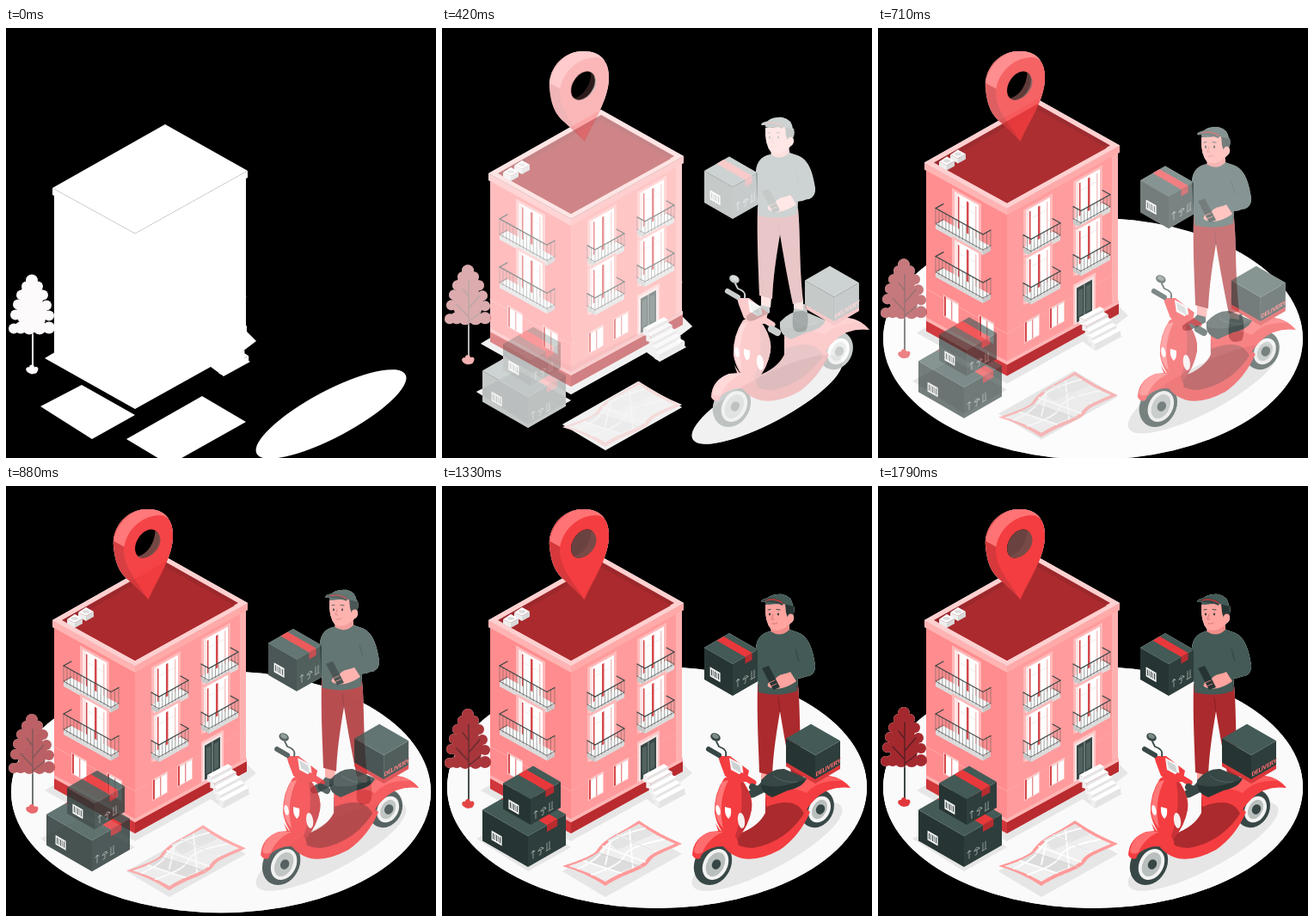
Animation, 500 px wide and 500 px high, one loop 1.83 s. Source, as an HTML page:

```html
<!DOCTYPE html>
<html lang="en">
<head>
<meta charset="utf-8">
<title>Delivery</title>
<style>
html, body { margin: 0; width: 100%; height: 100%; overflow: hidden; background: #000; }
svg { display: block; width: 100vw; height: 100vh; }
text { font: 600 7px Roboto, "Liberation Sans", sans-serif; letter-spacing: -.3px; }
</style>
</head>
<body>
<script>
const LOOP = 1830, FRAME = 41.6;
const DARK = '#374745', DEEP = '#263533', MID = '#2e3e3c', KNIT = '#435a56';
const RED = '#f43d40', WINE = '#ab2a2d', PALE = '#ffc6c6', SKIN = '#ffa49f';

const poly = (pts, fill) => `<polygon points="${pts}" fill="${fill}"/>`;
const path = (d, fill, extra = '') => `<path d="${d}" fill="${fill}" ${extra}/>`;
const line = (d, color, w = 1) =>
  `<path d="${d}" fill="none" stroke="${color}" stroke-width="${w}" stroke-linecap="round"/>`;
const rect = (x, y, w, h, fill) => `<rect x="${x}" y="${y}" width="${w}" height="${h}" fill="${fill}"/>`;
const oval = (x, y, rx, ry, fill, turn = 0) =>
  `<ellipse cx="${x}" cy="${y}" rx="${rx}" ry="${ry}" fill="${fill}" transform="rotate(${turn} ${x} ${y})"/>`;
const skew = (x, y, slope, body) => `<g transform="matrix(1 ${slope} 0 1 ${x} ${y})">${body}</g>`;
const LEFT = .553, RIGHT = -.557;

// x, y is the front corner of the lid; a and b are the widths of the left and right faces
function carton(x, y, a, b, h, marked = true) {
  const s = .575;
  const at = (u, v, d = 0) => `${x - a * u + b * v},${y - s * (a * u + b * v) + d} `;
  let out = poly(at(0, 0) + at(1, 0) + at(1, 0, h) + at(0, 0, h), DEEP)
    + poly(at(0, 0) + at(0, 1) + at(0, 1, h) + at(0, 0, h), MID)
    + poly(at(0, 0) + at(1, 0) + at(1, 1) + at(0, 1), KNIT);
  if (!marked) return out;
  out += poly(at(0, .5) + at(1, .5) + at(1, .78) + at(0, .78), '#e9383b')
    + poly(at(0, .5) + at(0, .78) + at(0, .78, 8) + at(0, .5, 8), '#b82c30');
  let bars = rect(0, 0, 12, 11, '#f5f5f5');
  for (let i = 0; i < 5; i++) bars += rect(1.5 + i * 2, 2, i % 2 ? .6 : 1, 7, DEEP);
  out += skew(x - a * .8, y - s * a * .8 + h * .5, s, bars);
  const icons = 'M3 1V10M1 3L3 1L5 3M9 5Q12 0 15 5ZM12 5V9Q12 11 10 10M19 1V10M22 1V10M18 10H23';
  return out + skew(x + 3, y + h * .55 - 2, -s, line(icons, '#a9b1af', .8));
}

function frenchWindow(x, y, slope) {
  const b = rect(-3, -3, 34, 55, '#ffb9b9') + rect(0, 0, 28, 52, '#fff') + rect(0, 0, 4, 52, '#fbe6e6')
    + rect(4, 3, 1.5, 49, '#d5484b') + rect(14, 3, 2.5, 49, '#d5484b') + rect(24, 3, 1.5, 49, '#f3c6c6')
    + rect(6, 12, 7, .8, '#e4e4e4') + rect(17, 12, 7, .8, '#e4e4e4');
  return skew(x, y, slope, b);
}
function smallWindow(x, y, slope) {
  return skew(x, y, slope, rect(-1, -1, 18, 25, PALE) + rect(0, 0, 16, 23, '#fff')
    + rect(0, 0, 2, 23, '#d5484b') + rect(8, 0, 1.4, 23, '#e58c8d') + rect(2, 0, 14, 1.5, '#f3c6c6'));
}

// front rail starts at x, y on slab level; dx is its run and side is the end joined to the wall
function balcony(x, y, dx, slope, side, h) {
  const dy = dx * slope, s = side * 9;
  const x2 = x + dx, y2 = y + dy;
  let out = poly(`${x},${y - 4} ${x + s},${y - 9} ${x2 + s},${y2 - 9} ${x2},${y2 - 4}`, '#fafafa')
    + poly(`${x},${y - 4} ${x2},${y2 - 4} ${x2},${y2 + 1} ${x},${y + 1}`, '#dcdcdc');
  const ex = side > 0 ? x2 : x, ey = side > 0 ? y2 : y;
  out += poly(`${ex},${ey - 4} ${ex + s},${ey - 9} ${ex + s},${ey - 4} ${ex},${ey + 1}`, '#c9c9c9');
  const n = Math.round(dx / 4);
  let thin = '';
  for (let i = 0; i <= n; i++) thin += `M${x + dx * i / n} ${y + dy * i / n - 4}v${4 - h}`;
  for (let i = 1; i < 3; i++) thin += `M${ex + s * i / 2} ${ey - 4 - 2.5 * i}v${4 - h}`;
  const rail = k => `M${x + s} ${y - k - 5}L${x} ${y - k}L${x2} ${y2 - k}L${x2 + s} ${y2 - k - 5}`;
  return out + line(thin, '#4a5553', .5) + line(rail(h), '#3a4644', 1.2) + line(rail(5), '#4a5553', .8);
}

function building() {
  let o = poly('56,160 150,212 150,404 56,351', '#ff8c8e')
    + poly('150,212 279,140 279,332 150,404', '#ff9b9c')
    + poly('56,340 150,391 150,404 56,352', '#d0363a') + poly('150,391 280,320 280,332 150,404', '#b92b2f')
    + poly('56,336 150,387 150,391 56,340', '#ffb0b0') + poly('150,387 280,316 280,320 150,391', '#ffb5b5')
    + line('M56 303L150 355L279 283', '#ffa6a6', 1)
    + poly('272,147 279,143 279,316 272,320', '#ffb0b0');
  o += poly('54,156 150,209 150,217 54,164', '#ffb3b3') + poly('150,209 281,136 281,144 150,217', '#ffa9a9')
    + poly('54,156 185,82 281,136 150,209', '#ffd0d0')
    + poly('65,156 185,88 270,136 150,203', '#9c282c') + poly('70,159 185,94 266,139 150,203', WINE);
  for (const [x, y] of [[84, 147], [71, 155]])
    o += poly(`${x},${y} ${x + 9},${y - 6} ${x + 18},${y - 1} ${x + 9},${y + 4}`, '#fff')
      + poly(`${x},${y} ${x + 9},${y + 4} ${x + 9},${y + 10} ${x},${y + 5}`, '#eee')
      + poly(`${x + 9},${y + 4} ${x + 18},${y - 1} ${x + 18},${y + 5} ${x + 9},${y + 10}`, '#d9d9d9')
      + oval(x + 9, y - 1, 4, 2, '#ddd');
  for (const dy of [0, 56]) {
    o += frenchWindow(89, 190 + dy, LEFT) + balcony(67, 232 + dy, 55, LEFT, 1, 23);
    for (const [dx, up] of [[58, 33], [0, 0]])
      o += frenchWindow(172 + dx, 212 + dy - up, RIGHT) + balcony(178 + dx, 264 + dy - up, 34, RIGHT, -1, 19);
  }
  o += smallWindow(77, 311, LEFT) + smallWindow(118, 334, LEFT)
    + smallWindow(171, 342, RIGHT) + smallWindow(200, 326, RIGHT);
  o += skew(229, 300, RIGHT, rect(-2, -3, 26, 47, PALE) + rect(0, 0, 22, 44, '#f6e3e3') + rect(2, 3, 18, 40, DARK)
    + rect(10.5, 3, 1, 40, '#8fa09d') + rect(4, 7, 5, 30, '#52625f') + rect(13, 7, 5, 30, '#52625f'));
  for (let i = 0; i < 5; i++) {
    const x = 234 + i * 3.4, y = 336 + i * 7, w = 24 + i * 1.4, r = w * .53;
    o += poly(`${x},${y} ${x + w},${y - r} ${x + w + 5},${y - r + 3} ${x + 5},${y + 3}`, '#fff')
      + poly(`${x + 5},${y + 3} ${x + w + 5},${y - r + 3} ${x + w + 5},${y - r + 9} ${x + 5},${y + 9}`, '#e4e4e4')
      + poly(`${x},${y} ${x + 5},${y + 3} ${x + 5},${y + 9} ${x},${y + 8}`, '#f0f0f0');
  }
  return o;
}

const shadows = () =>
  poly('45,354 150,413 238,364 253,375 284,358 270,350 291,334 275,318 150,380 60,345', '#e6e6e6')
  + poly('40,410 88,385 150,420 100,448', '#e6e6e6')
  + poly('140,448 228,398 279,428 190,478', '#e6e6e6')
  + oval(378, 419, 98, 27, '#e6e6e6', -28);

const pin = () =>
  path('M164 27C140 27 123 48 125 70C127 92 133 102 143 110L166 132C174 112 194 84 194 58C194 38 184 27 164 27Z', '#d6383b')
  + path('M164 27C143 27 128 45 125 64L138 71C142 53 158 37 178 35L189 38C184 30 175 27 164 27Z', '#ff7375')
  + path('M179 34C157 34 137 54 137 76C138 98 154 112 165 132C173 112 194 84 194 58C194 43 189 34 179 34Z', RED)
  + oval(164, 67, 12, 18, '#000', 32) + `<g id="inner">${oval(164, 67, 12, 18, '#6a4240', 32)}</g>`
  + path('M173.5 51.7C181 56 182 67 174 76C167 84 158 85 153 82C165 79 173 66 173.5 51.7Z', '#784a47');

function tree() {
  const leaves = [[30, 264, 7], [24, 271, 6], [37, 271, 6], [18, 281, 6], [43, 281, 6], [30, 282, 14], [14, 292, 6],
    [47, 293, 6], [30, 302, 18], [11, 304, 6], [50, 305, 6], [9, 320, 6], [17, 319, 7], [27, 319, 8], [39, 319, 8], [50, 319, 7]];
  return leaves.map(([x, y, r]) => oval(x, y, r, r, '#a4292e')).join('')
    + line('M31 368V275M31 318L17 303M31 308L44 293M31 323L45 312M31 294L24 285', '#571f23', 1.4)
    + line('M31 368V328', '#3e4543', 2)
    + path('M30 373C21 371 22 364 27 365C27 361 33 361 33 365C38 363 39 368 35 372Z', '#e2383b');
}

const map = () =>
  path('M140 442C158 436 172 431 179 425C190 408 204 406 229 389Q252 405 279 416C260 425 246 429 241 437C235 447 212 450 190 465Q166 449 140 442Z', '#ff9a9a')
  + path('M147 442C164 437 176 431 182 426C194 411 206 407 229 393Q249 407 271 416C255 423 243 427 238 434C231 444 210 447 190 460Q169 448 147 442Z', '#efefef')
  + poly('166,435 183,426 228,441 207,449', '#dcdcdc') + poly('192,412 229,393 246,405 204,423', '#e4e4e4')
  + line('M158 445Q182 434 189 421T236 398M174 452Q208 441 212 430T258 411M165 436L208 450M187 419L236 437M204 406L248 425M218 400L222 444M196 413L190 440', '#fff', 1.8)
  + line('M183 427L233 443M203 406L246 424', '#d2d2d2', .8);

function man() {
  return path('M372 342c-3 8 -12 9 -18 15c-1 5 3 7 9 5l18 -9v-11Z', DARK)
    + path('M410 344c-2 10 -3 18 -2 26q3 9 15 4q5 -10 0 -31Z', DARK)
    + poly('371,330 383,334 382,347 371,344', SKIN) + poly('409,336 420,338 420,350 409,348', SKIN)
    + path('M367 230L414 232C417 262 415 296 420 340L408 343C402 314 398 292 393 262C388 292 385 312 384 337L369 333C368 300 366 270 367 230Z', WINE)
    + line('M393 262L391 246', '#842025', 1)
    + poly('384,158 403,158 405,174 394,180 382,172', '#f08d8a')
    + path('M382 169C370 171 364 180 365 194L368 240Q394 246 413 238L414 222L427 221Q435 217 434 208C431 190 427 175 413 170L404 167Q394 177 382 169Z', KNIT)
    + line('M411 190L415 204L410 220M413 233L412 216', DARK, 1.2)
    + path('M411 202L432 212Q428 223 412 224L398 230L393 218L411 211Z', KNIT)
    + path('M405 216L412 227C400 236 386 238 379 233C377 229 384 226 388 224C392 218 400 219 405 216Z', SKIN)
    + path('M372 212L380 209L393 234L385 237Z', DEEP)
    + line('M387 226L380 229M389 230L382 233', '#e0827f', .9)
    + path('M376 138L403 136Q410 148 405 160Q394 171 383 167Q375 158 376 138Z', SKIN)
    + path('M399 137L409 139Q411 147 407 151L402 154L400 147Z', DEEP)
    + oval(405, 154, 4, 5.5, SKIN, 15)
    + oval(381, 149, 1, 1.6, '#2a3130') + oval(391, 149, 1, 1.6, '#2a3130')
    + line('M379 144L382 143.5M389 143.5L393 144', DARK, 1)
    + line('M385 149L383 155L386 155M384 160Q388 161 390 159', '#d97676', 1)
    + path('M376 137C376 128 386 125 396 126Q407 128 408 140Q397 135 380 138Z', KNIT)
    + path('M373 132Q383 127 397 135L396 139Q384 134 372 135Q370 134 373 132Z', DARK)
    + line('M377 133Q387 130 396 136', '#c4383b', 1.3);
}

function scooter() {
  const wheel = (x, y, rx, ry) => oval(x, y, rx, ry, DARK, 28) + oval(x + 3, y + 1, rx - 7, ry - 7, '#f3f3f3', 28)
    + oval(x + 3, y + 1, rx - 11, ry - 11, '#b9bfbd', 28) + oval(x + 4, y + 1, 5, 6, DARK, 28);
  return wheel(436, 375, 19, 23) + wheel(315, 439, 21, 26)
    // floor board and rear body
    + path('M376 362L405 352L430 362Q420 400 372 428Q350 434 336 416L346 404Q368 396 376 380Z', WINE)
    + path('M318 392Q335 421 361 421Q402 414 424 376L428 379Q416 407 393 423Q350 446 328 420Z', RED)
    + path('M376 358L410 344Q455 326 475 351Q451 348 435 363Q425 373 421 381Q411 360 377 373Z', RED)
    + path('M410 344Q448 331 466 343Q438 341 424 357Q410 350 390 353Z', '#ff5a5c')
    // leg shield
    + path('M328 340Q340 331 352 346Q362 362 360 376Q356 396 346 406L338 416Q320 400 317 380Q316 358 328 340Z', RED)
    + path('M350 344Q362 362 360 376Q357 394 344 410L338 414Q353 380 347 345Z', '#c83236')
    + path('M326 344Q315 366 319 385Q322 393 327 398Q320 368 333 342Z', '#ff7778')
    // front fender
    + path('M291 429Q292 409 312 402L334 400Q348 410 344 427Q329 415 314 421Q302 425 300 433Q294 435 291 429Z', RED)
    + path('M293 424Q297 406 313 402L327 402Q309 410 303 426Q295 430 293 424Z', '#ff6d6f')
    + oval(321, 377, 2.5, 6, '#fff', -12) + oval(348, 389, 4, 9, '#f7eeee', -8)
    + path('M329 373L336 375Q337 384 333 387Q328 382 329 373Z', '#fff')
    // steering head
    + path('M321 314L335 314L357 331L354 344Q340 345 329 337L323 321Z', RED)
    + poly('334,316 349,324 351,338 336,330', '#f7f7f7') + poly('336,319 346,325 348,334 338,328', '#cdd2d1')
    + line('M310 306L322 313', DARK, 6) + line('M349 337L362 345', RED, 7) + line('M361 350L368 354', DARK, 8)
    + line('M330 314Q332 306 322 303L319 297', DARK, 1.8)
    + oval(318, 292, 6, 4.5, DARK, 25) + oval(318, 291, 4, 2.6, '#7d8a87', 25)
    // seat and rack
    + path('M371 342Q383 328 398 329L424 340Q421 348 402 352L383 361Q370 357 371 342Z', DARK)
    + path('M371 347Q390 354 423 341Q420 350 402 354L384 362Q371 357 371 347Z', DEEP)
    + line('M386 337Q396 346 413 344', '#52625f', 1)
    + poly('400,320 434,340 463,324 463,329 434,346 400,326', '#d9373a')
    + carton(434, 313, 34, 29, 28, false)
    + skew(434.5, 338, -.575, '<text fill="#ff6b6d">DELIVERY</text>');
}

const wave = (d, lead = 0) => t => (1 - Math.cos(Math.PI * Math.min(1, (t + lead) / d))) / 2;
const glide = d => t => Math.sin(Math.PI / 2 * Math.min(1, (t + 20) / d));

// name, drawing, start offset x, y, progress, progress needed to show
const parts = [
  ['floor', oval(250, 350.5, 244, 140.5, '#fafafa'), 0, 30, wave(1200), .41],
  ['shadows', shadows(), 0, 30, wave(800, 20), 0],
  ['building', building(), 0, 30, wave(800, 20), 0],
  ['pin', pin(), 0, 0, wave(1000), .012],
  ['tree', tree(), 0, 30, glide(1700), 0],
  ['map', map(), 0, 30, wave(1200), .012],
  ['cartons', carton(100, 407, 53, 44, 36) + carton(103, 364, 32, 35, 30), 0, 30, wave(1200), .012],
  ['man', man(), 0, -30, wave(1200), .012],
  ['parcel', carton(338, 207, 33, 29, 37), 0, -30, wave(1200), .012],
  ['scooter', scooter(), 30, 0, wave(1200), .012]
];

// White silhouettes lie beneath everything, so fading parts pale to white
document.body.innerHTML = `<svg viewBox="0 0 500 500">
  <filter id="white" filterUnits="userSpaceOnUse" x="0" y="0" width="500" height="500">
    <feColorMatrix values="0 0 0 0 1  0 0 0 0 1  0 0 0 0 1  0 0 0 1 0"/></filter>
  <g filter="url(#white)">${parts.map(p => `<use id="${p[0]}-base" href="#${p[0]}"/>`).join('')}</g>
  <g id="gap">${oval(164, 67, 12, 18, '#000', 32)}</g>
  ${parts.map(p => `<g id="${p[0]}-fade"><g id="${p[0]}">${p[1]}</g></g>`).join('')}
</svg>`;

const el = id => document.getElementById(id);
const nodes = parts.map(p => [el(p[0]), el(p[0] + '-fade'), el(p[0] + '-base')]);
const inner = el('inner');

function draw() {
  const t = Math.floor(performance.now() % LOOP / FRAME) * FRAME;
  parts.forEach(([, , dx, dy, ease, min], i) => {
    const p = ease(t), [shape, fade, base] = nodes[i], shown = p >= min;
    shape.setAttribute('transform', `translate(${dx * (1 - p)} ${dy * (1 - p)})`);
    fade.setAttribute('opacity', shown ? p : 0);
    base.setAttribute('opacity', shown ? 1 : 0);
  });
  inner.setAttribute('opacity', t > 1080 ? 1 : 0);
  requestAnimationFrame(draw);
}
draw();
</script>
</body>
</html>
```
